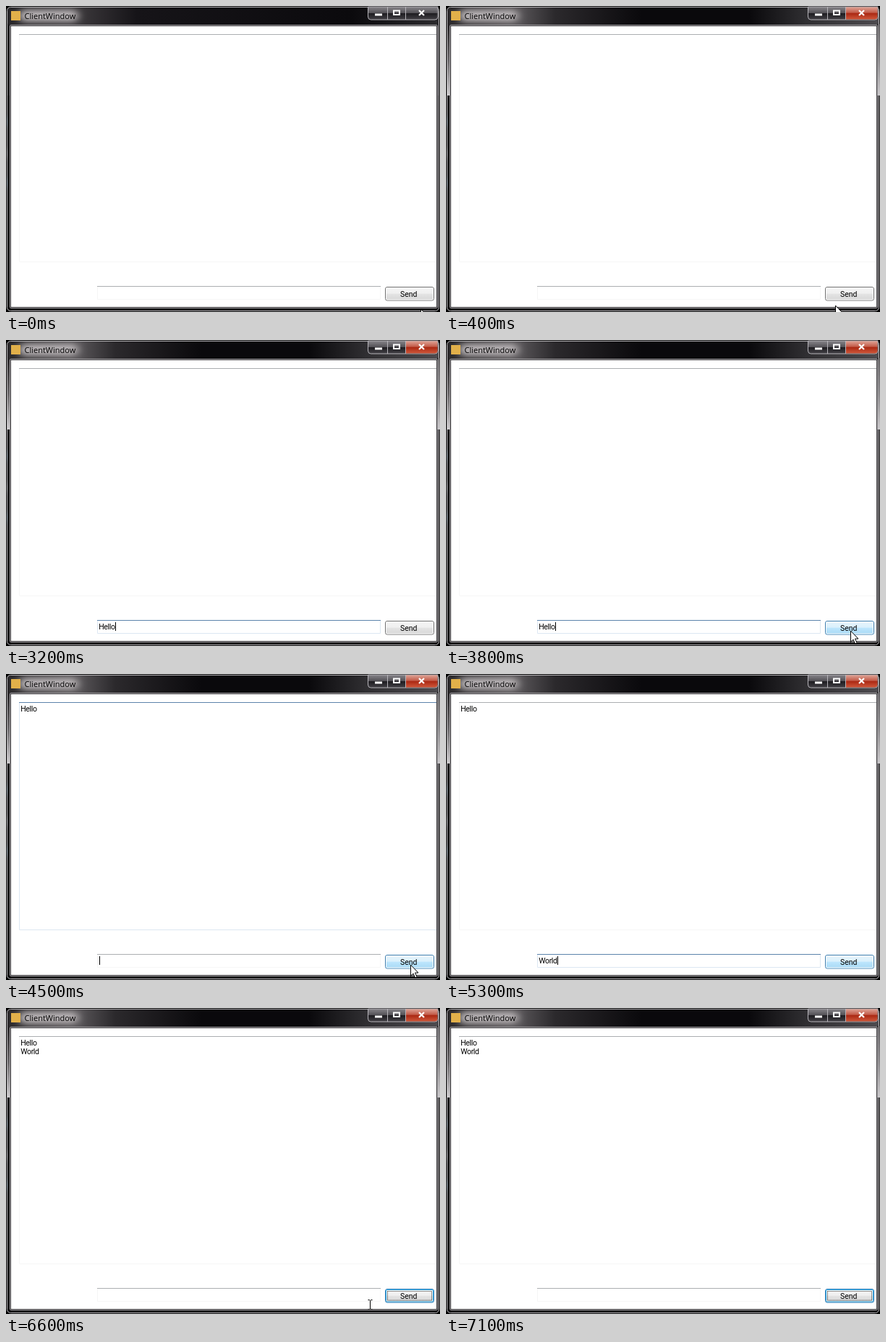
Animation of 600 by 424 pixels, one loop 7.2 s. Source, as an HTML page:

```html
<!DOCTYPE html>
<html lang="en">
<head>
<meta charset="utf-8">
<title>ClientWindow</title>
<style>
  html, body { margin: 0; width: 100%; height: 100%; overflow: hidden; background: #000; }
  svg { display: block; width: 600px; height: 424px; }
  text { font: 10.5px Roboto, "Liberation Sans", sans-serif; letter-spacing: -.35px; fill: #000; white-space: pre; }
  .title { font: 11px "Open Sans", "Noto Sans", sans-serif; letter-spacing: 0; }
  .send { letter-spacing: 0; }
</style>
</head>
<body>
<svg viewBox="0 0 600 424">
  <defs>
    <linearGradient id="bar">
      <stop offset="0" stop-color="#2c2a2c"/><stop offset=".17" stop-color="#565356"/>
      <stop offset=".25" stop-color="#2b292c"/><stop offset=".45" stop-color="#0a090c"/>
      <stop offset=".7" stop-color="#0a090c"/><stop offset=".83" stop-color="#2f2e31"/>
      <stop offset="1" stop-color="#4d4b4f"/>
    </linearGradient>
    <linearGradient id="barIdle">
      <stop offset="0" stop-color="#29272a"/><stop offset=".17" stop-color="#3a373a"/>
      <stop offset=".3" stop-color="#161418"/><stop offset=".8" stop-color="#0b0a0d"/>
      <stop offset="1" stop-color="#2b2a2d"/>
    </linearGradient>
    <linearGradient id="side" x2="0" y2="1">
      <stop offset="0" stop-color="#2a282a"/><stop offset=".5" stop-color="#6b696b"/>
      <stop offset="1" stop-color="#d2d0d2"/>
    </linearGradient>
    <linearGradient id="glass" x2="0" y2="1">
      <stop offset="0" stop-color="#89878c"/><stop offset=".48" stop-color="#535156"/>
      <stop offset=".5" stop-color="#1c1b1f"/><stop offset="1" stop-color="#434146"/>
    </linearGradient>
    <linearGradient id="red" x2="0" y2="1">
      <stop offset="0" stop-color="#dfa497"/><stop offset=".46" stop-color="#c25a47"/>
      <stop offset=".5" stop-color="#a92712"/><stop offset="1" stop-color="#d0573a"/>
    </linearGradient>
    <linearGradient id="btn" x2="0" y2="1">
      <stop offset="0" stop-color="#f6f6f6"/><stop offset=".48" stop-color="#efefef"/>
      <stop offset=".5" stop-color="#e4e4e4"/><stop offset="1" stop-color="#d6d6d6"/>
    </linearGradient>
    <linearGradient id="btnHot" x2="0" y2="1">
      <stop offset="0" stop-color="#eaf6fd"/><stop offset=".48" stop-color="#d9f0fc"/>
      <stop offset=".5" stop-color="#bee6fd"/><stop offset="1" stop-color="#a7d9f5"/>
    </linearGradient>
    <filter id="blur" x="-30%" y="-100%" width="160%" height="300%"><feGaussianBlur stdDeviation="6 4"/></filter>
    <filter id="soft" x="-200%" y="-100%" width="500%" height="300%"><feGaussianBlur stdDeviation="1 4"/></filter>
    <clipPath id="head"><rect x="2" y="2" width="596" height="25"/></clipPath>
  </defs>

  <!-- window frame -->
  <rect width="600" height="424" fill="#000"/>
  <rect x="1" y="1" width="598" height="422" rx="5" fill="#0b0a0c"/>
  <g id="idle">
    <rect x="2" y="2" width="596" height="25" rx="4" fill="url(#barIdle)"/>
    <rect x="2" y="26" width="4" height="98" fill="#1d1b1f"/>
    <rect x="596" y="26" width="3" height="98" fill="#1d1b1f"/>
  </g>
  <g id="active">
    <rect x="2" y="2" width="596" height="25" rx="4" fill="url(#bar)"/>
    <rect x="1" y="25" width="5" height="99" fill="url(#side)"/>
    <rect x="596" y="25" width="4" height="99" fill="url(#side)"/>
  </g>
  <g filter="url(#soft)">
    <rect x="1" y="156" width="2" height="9" fill="#1d4256"/>
    <rect x="1" y="200" width="2" height="9" fill="#4d5053"/>
    <rect x="1" y="241" width="2" height="9" fill="#1b4258"/>
  </g>
  <g clip-path="url(#head)">
    <rect x="18" y="5" width="82" height="17" rx="8" fill="#b8b3b5" filter="url(#blur)"/>
  </g>
  <rect x="1.500" y="1.500" width="597" height="421" rx="5" fill="none" stroke="#bdbbbe"/>
  <rect x="5.500" y="26.500" width="591" height="392" rx="1" fill="none" stroke="#a9a7aa"/>
  <rect x="6.500" y="27.500" width="589" height="390" fill="#fff" stroke="#3a383b"/>
  <rect x="7" y="7" width="13" height="13" fill="#e2b04a"/>
  <text class="title" x="25.500" y="18">ClientWindow</text>

  <!-- caption buttons -->
  <path d="M500.500 1V15q0 4 4 4H593q4 0 4-4V1Z" fill="url(#glass)" stroke="#b5b3b8"/>
  <path id="close" d="M553 1.500V18.500H593q3.500 0 3.500-4V1.500Z" fill="url(#red)"/>
  <path d="M527.500 1V19M552.500 1V19" stroke="#b5b3b8"/>
  <g fill="none" stroke="#fff">
    <path d="M510 12H520" stroke-width="3"/>
    <rect x="536" y="6.500" width="8" height="5.500" stroke-width="2"/>
    <path d="M571 6L578 13M578 6L571 13" stroke-width="2.200"/>
  </g>

  <!-- message list -->
  <path id="listSides" d="M18.500 40V354.500H595" fill="none"/>
  <path id="listTop" d="M18 39.500H595"/>
  <text id="line1" x="20.200" y="52">Hello</text>
  <text id="line2" x="20.200" y="64">World</text>

  <!-- input -->
  <path id="inputSides" d="M126.500 389V406.500H517.500V389" fill="none"/>
  <path id="inputTop" d="M126 388.500H518"/>
  <text id="typed" x="128.200" y="401"></text>
  <rect id="caret" y="391" width="1" height="12"/>

  <!-- send button -->
  <rect id="send" x="524.500" y="389.500" width="67" height="18.500" rx="2.500"/>
  <rect id="sendIn" x="525.500" y="390.500" width="65" height="16.500" rx="1.500" fill="none"/>
  <rect id="focus" x="527.500" y="392.500" width="61" height="12.500" fill="none" stroke="#333" stroke-dasharray="1 1"/>
  <text class="send" x="545" y="403">Send</text>

  <path id="arrow" d="M.5 0V15.500L4 12L6.700 18L9.200 17L6.600 11H11Z" fill="#fff" stroke="#000"/>
  <path id="beam" d="M-3 -6.500H-1L0 -5.500L1 -6.500H3M0 -6V6M-3 6.500H-1L0 5.500L1 6.500H3" fill="none" stroke="#000"/>
</svg>
<script>
const LOOP = 7200, STEP = 100, BLINK = 530;
const ACTIVATE = 400, FOCUS = 900, SEND1 = 4000, RETYPE = 4800, SEND2 = 6000;
const $ = id => document.getElementById(id);
const set = (id, attrs) => { for (const k in attrs) $(id).setAttribute(k, attrs[k]); };
const show = (id, on) => set(id, { visibility: on ? 'visible' : 'hidden' });

// time, text in the input
const typing = [
  [FOCUS, ''], [1300, 'H'], [1700, 'He'], [1900, 'Hel'], [2200, 'Hell'], [2700, 'Hello'],
  [SEND1, ''], [RETYPE, 'W'], [4900, 'Wo'], [5000, 'Wor'], [5100, 'Worl'], [5200, 'World'], [SEND2, '']
];
// visible pointer runs: time, x, y
const runs = [
  [[0, 573, 420], [800, 503, 409], [1200, 503, 409]],
  [[3300, 503, 409], [3700, 559, 403], [4700, 559, 403]],
  [[5700, 559, 403], [6300, 559, 403], [6600, 503, 411], [6800, 490, 432]]
];

const within = (t, a, b) => t >= a && t < b;

function pointer(t) {
  const run = runs.find(r => t >= r[0][0] && t <= r[r.length - 1][0]);
  if (!run) return null;
  const i = Math.max(1, run.findIndex(p => p[0] >= t));
  const [t0, x0, y0] = run[i - 1], [t1, x1, y1] = run[i];
  const k = (t - t0) / (t1 - t0);
  return [Math.round(x0 + (x1 - x0) * k), Math.round(y0 + (y1 - y0) * k)];
}

function border(name, hot) {
  set(name + 'Top', { stroke: hot ? '#5c83ab' : '#abaeb1' });
  set(name + 'Sides', { stroke: hot ? '#dce7f2' : '#f6f6f6' });
}

function draw(t) {
  const active = t >= ACTIVATE;
  show('active', active);
  show('idle', !active);
  show('close', active);

  const [since, text] = typing.filter(e => e[0] <= t).pop() || [0, ''];
  $('typed').textContent = text;
  set('caret', { x: Math.round(128.6 + $('typed').getComputedTextLength()) });
  show('caret', within(t, FOCUS, SEND2) && Math.floor((t - since) / BLINK) % 2 === 0);

  show('line1', t >= SEND1);
  show('line2', t >= SEND2);
  border('list', within(t, SEND1 + 200, RETYPE));
  border('input', within(t, FOCUS, SEND1) || within(t, RETYPE, SEND2));

  const hot = within(t, 3700, 6400), focus = t >= SEND2;
  set('send', {
    fill: hot ? 'url(#btnHot)' : 'url(#btn)',
    stroke: focus ? '#2a78b4' : hot ? '#3c7fb1' : '#707070'
  });
  set('sendIn', { stroke: focus ? '#3db2ea' : '#fbfbfb' });
  show('focus', focus);

  const p = pointer(t);
  const beam = p && p[0] < 518;
  show('arrow', p && !beam);
  show('beam', beam);
  if (p) set(beam ? 'beam' : 'arrow', { transform: `translate(${p[0] + (beam ? .5 : 0)} ${p[1]})` });
}

const start = performance.now();
function tick() {
  const t = (performance.now() - start) % LOOP;
  draw(Math.floor(t / STEP) * STEP);
  requestAnimationFrame(tick);
}
tick();
</script>
</body>
</html>
```
